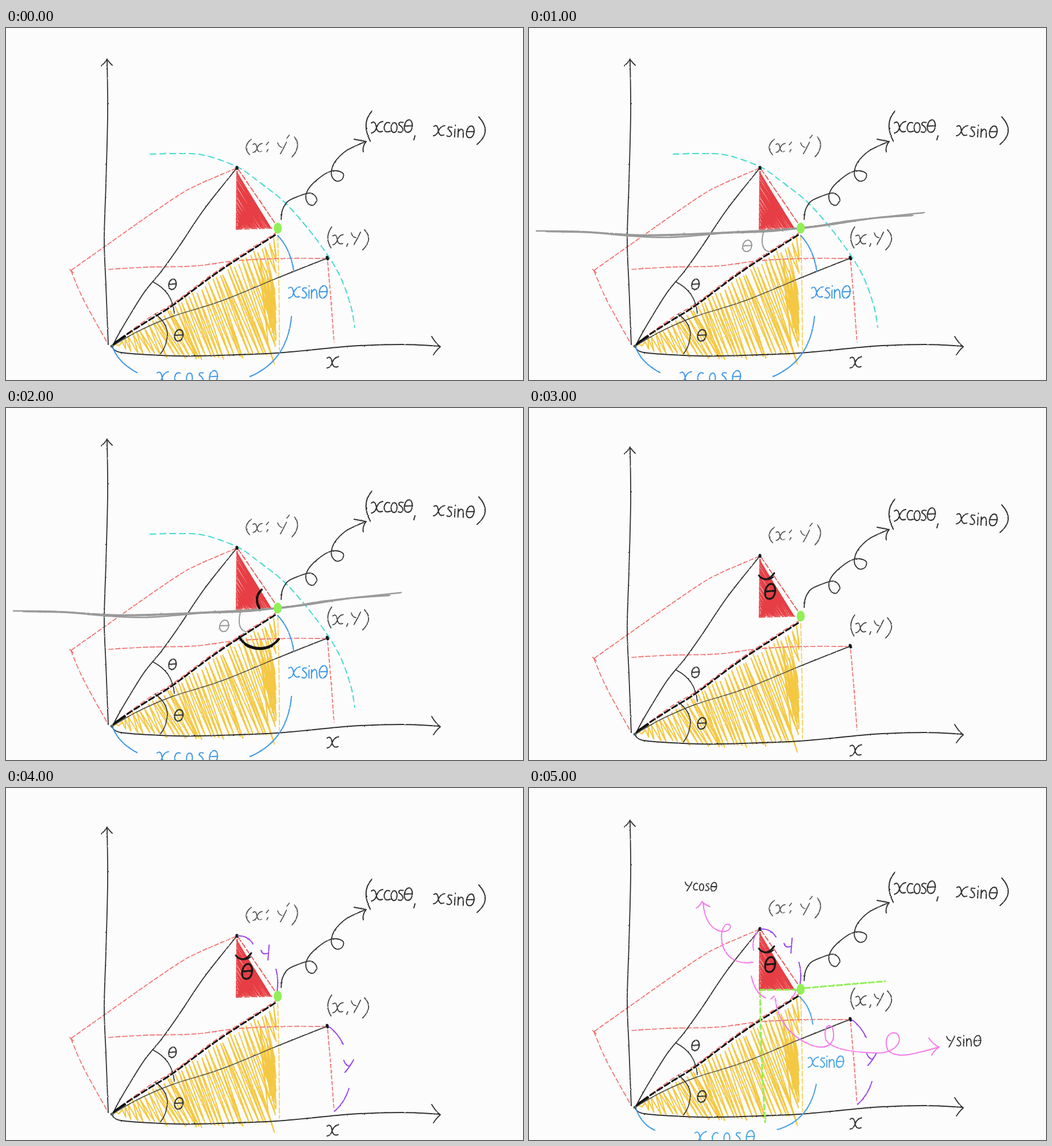
An HTML page for the animation above (6000 ms loop, 900x614 px).

```html
<!DOCTYPE html>
<html lang="en">
<head>
<meta charset="utf-8">
<title>Rotating a point</title>
<style>
html, body { margin: 0; width: 100%; height: 100%; overflow: hidden; background: #fcfcfc; }
svg { display: block; width: 100vw; height: 100vh; }
path { fill: none; stroke-linecap: round; stroke-linejoin: round; }
.glyph { vector-effect: non-scaling-stroke; }
</style>
</head>
<body>
<svg id="stage" viewBox="0 0 900 614">
  <defs>
    <filter id="pencil" filterUnits="userSpaceOnUse" x="0" y="-20" width="900" height="660" color-interpolation-filters="sRGB">
      <feTurbulence type="fractalNoise" baseFrequency=".3" numOctaves="2" seed="4"/>
      <feDisplacementMap in="SourceGraphic" scale="2" xChannelSelector="R" yChannelSelector="G"/>
    </filter>
  </defs>
  <g id="sketch" filter="url(#pencil)"></g>
</svg>
<script>
const STEP = 1000, STEPS = 6;
const SHIFT = [0, 0, 0, 14, 14, 2];
const INK = '#303030', GREY = '#999', RED = '#f26d6b', BLUE = '#3f97e6', SKY = '#48a5e6',
  TEAL = '#45dacf', PURPLE = '#9747ee', PINK = '#f379ea', GREEN = '#90f056', YELLOW = '#f4c842';

const sketch = document.getElementById('sketch');
const layers = [];
let target;

function add(tag, attrs, parent = target) {
  const el = document.createElementNS('http://www.w3.org/2000/svg', tag);
  for (const key in attrs) el.setAttribute(key, attrs[key]);
  return parent.appendChild(el);
}

// Visible from step `first` through step `last`
function layer(first, last) {
  target = add('g', {}, sketch);
  layers.push({ el: target, first, last });
}

function stroke(d, color = INK, width = 1.8, dash) {
  const attrs = { d, stroke: color, 'stroke-width': width };
  if (dash) Object.assign(attrs, { 'stroke-dasharray': dash, 'stroke-linecap': 'butt' });
  return add('path', attrs);
}

// Smooth path through points given as "x,y x,y ..."
function through(text) {
  const p = text.split(' ').map(pair => pair.split(',').map(Number));
  const at = i => p[Math.max(0, Math.min(p.length - 1, i))];
  let d = 'M' + p[0];
  for (let i = 0; i < p.length - 1; i++) {
    const [a, b, c, e] = [at(i - 1), at(i), at(i + 1), at(i + 2)];
    d += `C${b.map((v, k) => v + (c[k] - a[k]) / 6)} ${c.map((v, k) => v - (e[k] - b[k]) / 6)} ${c}`;
  }
  return d;
}

function random(seed) {
  return () => (seed = (seed * 16807) % 2147483647) / 2147483647;
}

// Handwritten letters: [width, strokes] with x-height 1
const GLYPHS = {
  x: [1, 'M0 .14Q.32-.12.42.46Q.5 1.06.95.88M1 .02Q.62.06.46.5Q.3.98 0 1'],
  c: [.55, 'M.52.16Q.2-.02.04.45Q-.02 1.1.55.88'],
  o: [.55, 'M.3.15C-.08.15-.08 1 .26 1S.62.15.3.15'],
  s: [.42, 'M.42.14Q.04.04.07.32Q.42.55.42.8Q.3 1.1 0 .94'],
  θ: [.8, 'M.46-.08C.02-.08-.16 1 .34 1S.86-.08.46-.08M.06.46L.76.42'],
  i: [.1, 'M.05.3V1M.07-.08V-.03'],
  n: [.5, 'M.02.25V1M.02.55Q.24.1.44.35Q.5.55.5 1'],
  y: [.8, 'M0 .02Q.1.4.42.46M.85-.05Q.6.5.25 1.1']
};

function glyph(name, x, y, w, h, color, width) {
  add('path', { class: 'glyph', d: GLYPHS[name][1], stroke: color, 'stroke-width': width,
    transform: `translate(${x} ${y}) scale(${w} ${h})` });
}

function word(text, x, y, size, gap, color = INK, width = 2, tilt = 0) {
  const outer = target;
  target = add('g', { role: 'img', 'aria-label': text, transform: `rotate(${tilt} ${x} ${y})` });
  for (const name of text) {
    glyph(name, x, y, size, size, color, width);
    x += GLYPHS[name][0] * size + gap;
  }
  target = outer;
}

function theta(cx, cy, w, h, color = INK, width = 2) {
  glyph('θ', cx - w / 2, cy - h * .43, w / .8, h / 1.08, color, width);
}

function yellowHatch() {
  const rnd = random(11), jitter = n => (rnd() - .5) * n;
  let d = 'M189 553';
  for (let x = 194; x < 470; x += 6.6) {
    const top = 553 - (x - 187) * .672 + 4;
    const floor = Math.min(574, 556 + (x - 187) * .3) - Math.max(0, x - 330) * .07;
    const run = Math.min((floor - top) * (x < 290 ? .62 : .42), 469 - x);
    const bottom = x + run > 467 ? top + run * 2.4 + rnd() * 22 : floor;
    d += `L${x + jitter(4)} ${top + jitter(9)}L${x + run + jitter(5)} ${bottom + jitter(8)}`;
  }
  stroke(d, YELLOW, 2.1);
  d = 'M446 432';
  for (let i = 0; i < 13; i++) {
    const x = 442 + i * 2;
    d += `L${x + jitter(3)} ${405 + rnd() * 55}L${Math.min(470, x + 14)} ${490 + rnd() * 68}`;
  }
  stroke(d, YELLOW, 1.8);
}

function redHatch() {
  const rnd = random(5);
  add('path', { d: 'M403 251L401 350L460 348Z', style: 'fill:#ee5a5c;fill-opacity:.55' });
  let d = 'M403 251';
  for (let y = 254; y < 348; y += 4.6) {
    const run = (349 - y) * .62;
    d += `L${402 + rnd() * 2} ${y}L${402 + run} ${347 + rnd() * 3}`;
  }
  stroke(d, '#e63e44', 2.1);
  stroke('M402 250L401 351', '#e63e44', 1.8, '6 2');
  stroke('M404 246L470 343', '#e65a58', 1.8, '9 4');
  stroke('M402 351L466 349', '#e65a58', 1.8, '9 4');
}

// Coloured areas and construction lines
layer(0, 5);
yellowHatch();
redHatch();
stroke('M473 362Q476 460 476 562', '#f7d36a', 2, '9 4');
stroke(through('400,245 335,273 300,292 240,333 175,379 113,423'), RED, 1.7, '7 4');
stroke(through('113,423 135,474 178,552'), RED, 1.7, '8 5');
stroke('M111 421L117 427', RED, 1.7);
stroke(through('179,421 210,419 250,417 330,415 400,406 480,402 556,402'), RED, 1.7, '8 4');
stroke(through('560,408 566,480 571,548'), RED, 1.7, '6 4');

layer(0, 2);
stroke(through('251,220 300,219 345,222 402,242 440,268 490,309 545,375 580,430 600,484 607,522'), TEAL, 2, '10 7');

layer(0, 5);
stroke(through('176,55 177,150 174,270 171,370 174,450 178,552'));
stroke('M166 66Q173 60 176 54Q179 60 185 65');
stroke(through('184,556 200,566 270,571 330,572 470,567 600,555 690,552 755,555'), INK, 2);
stroke('M741 538Q748 550 756 556Q750 561 744 570');
stroke(through('185,555 203,522 240,462 270,425 300,383 345,316 402,244'));
stroke(through('185,555 230,529 290,503 375,476 470,437'), '#4a4a40', 1.4);
stroke(through('470,437 510,421 558,402'));
stroke(through('189,549 250,505 290,481 370,422 470,357'), RED, 1.8, '8 6');
stroke(through('187,552 205,538 250,509 290,484 370,425 470,360'), '#111', 3, '10 5');
stroke('M190 549L207 538', '#111', 4);
stroke('M256 443Q290 460 293 498', INK, 1.6);
stroke('M260 499Q281 515 281 535Q279 557 269 568', INK, 1.6);
theta(290, 447, 15, 18);
theta(301, 536, 17, 20);
stroke('M402 243V245M559 400L560 403', '#181818', 5);
stroke('M184 555H185', '#4b6464', 5);

// Arrow and its label
stroke(through('479,334 481,318 490,303 508,294 530,288 541,298 535,309 526,306 522,294 527,280 540,266 560,252 575,249 587,254 585,264 575,267 567,258 568,243 576,229 594,213 626,198'));
stroke('M606 194L627 198Q620 207 622 216', INK, 2);
stroke('M637 145Q618 166 634 197', INK, 2);
word('xcosθ', 636, 163, 20, 1.5, INK, 2, -1);
stroke('M712 188L710 195', INK, 2);
word('xsinθ', 745, 169, 19, 4.5, INK, 2, 3);
stroke('M823 155Q847 181 820 203', INK, 2);

stroke('M427 194Q411 207 424 221', '#555');
word('x', 430, 201, 16, 0, '#555', 1.7);
stroke('M457 199L453 204M456 212L454 216', '#555');
word('y', 473, 200, 18, 0, '#555', 1.7);
stroke('M493 187L489 192', '#555');
stroke('M502 190Q515 205 498 225', '#555');

stroke('M567 347Q554 365 566 384', '#444');
word('x', 569, 360, 18, 0, '#444', 1.8);
stroke('M595 376L593 381', '#444');
word('y', 601, 357, 19, 0, '#444', 1.8);
stroke('M624 352Q640 368 621 387', '#444');
word('x', 559, 573, 20, 0);

// Projections of the first triangle
layer(0, 2);
stroke('M473 362Q495 385 501 424', BLUE, 2);
word('xsinθ', 492, 451, 20, 3, BLUE);
stroke('M497 503Q490 580 425 608', BLUE, 2);
stroke('M186 558Q197 585 228 601', BLUE, 2);
word('xcosθ', 263, 599, 20, 10, BLUE);

layer(1, 2);
stroke(through('13,354 90,355 200,361 330,357 470,349 560,336 688,322'), GREY, 2.6);
stroke(through('30,355 110,357 180,363 250,365 350,357 480,349 600,332 668,327'), GREY, 2.6);
stroke(through('170,362 240,362 330,358 420,355 500,345'), GREY, 2.2);
stroke('M408 356Q401 385 417 390', GREY, 2);
theta(380, 380, 18, 20, GREY);

layer(2, 2);
stroke('M445 317Q431 330 441 349', '#111', 4);
stroke('M406 399C420 425 456 427 475 403', '#111', 4);
stroke('M418 413Q440 425 462 415', '#111', 5);

layer(3, 5);
stroke('M400 278Q413 293 427 274', '#181818', 3);
stroke('M403 282Q414 289 425 281', '#181818', 2.4);
theta(420, 306, 20, 26, '#181818', 3.2);

layer(4, 5);
stroke('M404 244Q421 243 430 258', PURPLE, 2);
stroke('M458 260L456 286M444 269Q446 278 457 274', PURPLE, 2);
stroke('M470 302Q475 321 472 340', PURPLE, 2);
stroke('M562 402Q578 414 587 433', PURPLE, 2);
stroke('M588 461Q591 470 597 471M605 460Q599 472 590 482', PURPLE, 2);
stroke('M597 510Q590 534 572 550', PURPLE, 2);

// Final step: sides of the second triangle
layer(5, 5);
stroke('M402 350L470 350M480 347L620 335', GREEN, 3, '9 5');
stroke(through('402,354 404,440 407,510 411,581'), GREEN, 3, '9 5');
stroke('M471 362Q490 380 494 410', SKY, 2);
word('xsinθ', 486, 467, 18, 3, SKY);
stroke('M500 515Q488 578 432 594', SKY, 2);
stroke('M187 560Q198 586 219 595', SKY, 2);
word('xcosθ', 289, 597, 20, 9.5, SKY);
stroke('M398 250Q387 262 391 281', PINK, 2);
stroke('M387 326Q393 356 412 364', PINK, 2);
stroke('M421 366L427 361M457 363Q464 358 464 351', PINK, 2);
stroke('M390 302C365 306 342 296 336 268C332 243 342 233 349 236C354 243 345 252 330 247C312 240 305 222 303 198', PINK, 2);
stroke('M292 207Q298 203 301 196Q307 202 315 205', PINK, 2);
stroke('M429 365C432 403 455 433 495 448C525 456 535 438 528 416C520 406 512 418 517 438C530 458 590 461 615 460C640 456 652 438 640 426C625 421 617 438 625 456C640 470 665 464 713 450', PINK, 2);
stroke('M696 434Q703 445 714 450Q705 456 701 464', PINK, 2);
word('ycosθ', 272, 162, 14, 3, INK, 1.8, 2);
word('ysinθ', 727, 431, 17, 4, INK, 1.8);

layer(0, 5);
add('ellipse', { cx: 473, cy: 349, rx: 7, ry: 9.5, fill: GREEN });

let shown = -1;
function draw(time) {
  const step = Math.floor(time / STEP) % STEPS;
  if (step !== shown) {
    shown = step;
    sketch.setAttribute('transform', `translate(0 ${SHIFT[step]})`);
    for (const { el, first, last } of layers) {
      el.style.display = step >= first && step <= last ? '' : 'none';
    }
  }
}

const start = performance.now();
function tick() {
  draw(performance.now() - start);
  requestAnimationFrame(tick);
}
tick();
</script>
</body>
</html>
```
